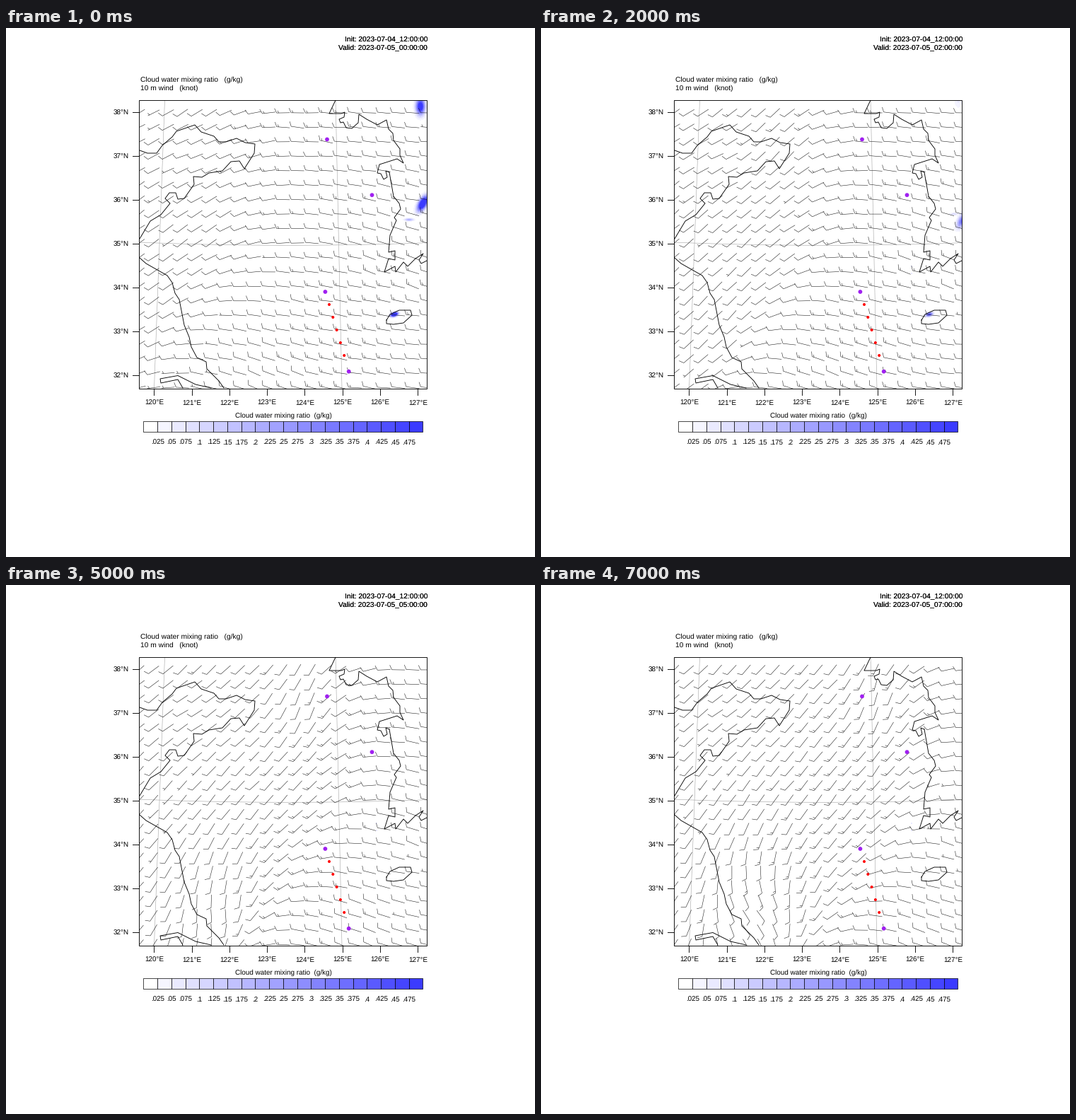
These frames come from a looping animation (748 by 748 pixels, 8 s). A matplotlib script:

```python
import numpy as np
import matplotlib.pyplot as plt
from matplotlib.animation import FuncAnimation
from matplotlib.collections import LineCollection
from matplotlib.patches import Circle, Rectangle

SIZE, DPI = 748, 100
PX = 72 / DPI  # points per pixel
L, R, T, B = 188.5, 595.5, 101.5, 509.5
HOURS = 8

plt.rcParams["font.family"] = "Liberation Sans"
plt.rcParams["text.hinting"] = "none"

fig = plt.figure(figsize=(SIZE / DPI, SIZE / DPI), dpi=DPI, facecolor="white")
ax = fig.add_axes([0, 0, 1, 1])
ax.set_axis_off()

# Key points of the coastlines, in stage pixels
SHANDONG = [
    (189, 173), (200, 177), (213, 177), (221, 166), (235, 154), (241, 146),
    (267, 137), (276, 147), (294, 153), (301, 161), (311, 161), (326, 156),
    (338, 162), (352, 164), (351, 177), (337, 199), (330, 188), (318, 189),
    (306, 202), (287, 205), (277, 211), (265, 210), (266, 221), (252, 241),
    (243, 242), (240, 233), (231, 233), (225, 241), (232, 248), (219, 264),
    (204, 273), (189, 298)]
JIANGSU = [
    (189, 325), (198, 333), (228, 350), (235, 360), (239, 375), (245, 384),
    (252, 420), (259, 437), (262, 451), (270, 466), (283, 472), (284, 482),
    (301, 499), (308, 509)]
ESTUARY = [
    (250, 509), (243, 497), (219, 502), (218, 496), (243, 491.5), (268, 504),
    (290, 509)]
KOREA_NORTH = [
    (466, 102), (457, 121), (474, 121), (479, 119), (478, 126), (471, 129),
    (473, 134), (477, 133), (481, 141), (489, 142), (498, 134), (499, 122),
    (510, 129), (525, 137), (538, 130), (541, 143), (547, 149), (548, 159),
    (557, 171), (557, 180), (562, 191), (553, 185), (528, 193), (525, 205),
    (530, 206), (534, 214), (539, 211), (537, 202), (542, 204)]
KOREA_SOUTH = [
    (542, 204), (548, 238), (556, 248), (558, 256), (549, 268), (552, 272),
    (543, 293), (541, 317), (550, 315), (550, 328), (541, 326), (535, 345),
    (550, 337), (551, 345), (562, 331), (568, 337), (579, 326), (590, 319),
    (584, 328), (587, 333), (595, 329)]
ISLAND = [
    (538, 413), (543, 405), (556, 399), (572, 399), (574, 406), (562, 417),
    (548, 419), (538, 418), (538, 413)]

COLS, ROWS = 21, 20
BX, BY = np.meshgrid(L + 20.35 * np.arange(COLS), 508.5 - 20.45 * np.arange(ROWS))
rng = np.random.default_rng(4)
WOBBLE = rng.normal(0, 2.5, BX.shape)
GUST = rng.normal(0, 1.2, BX.shape)


def shade(step):
    """Colour of the bar's boxes, 0 (white) to 19 (blue)."""
    f = np.asarray(step) / 19
    return np.stack([1 - .77 * f, 1 - .77 * f, np.ones_like(f)], axis=-1)


def label(x, y, s, px=10.3, ha="left"):
    return ax.text(x, y, s, fontsize=px * PX, ha=ha, va="baseline", zorder=8)


def stroke(points, color="black", width=.9, z=4, clip=True):
    xs, ys = zip(*points)
    line, = ax.plot(xs, ys, color=color, lw=width * PX, zorder=z,
                    solid_joinstyle="round")
    if clip:
        line.set_clip_path(frame)


def bump(x, y, cx, cy, rx, ry):
    return np.exp(-((x - cx) / rx) ** 2 - ((y - cy) / ry) ** 2)


def front(hour):
    """Line where southwesterlies meet westerlies; it moves east."""
    return 345 + 30 * hour - .75 * np.maximum(BY - 300, 0)


def heading(hour):
    """Degrees above east that the wind blows to."""
    edge = front(hour)
    west = (-4 - 14 * bump(BX, BY, 570, 310, 120, 110)
            - 16 * bump(BX, BY, 370 + 25 * hour, 500, 110, 90))
    south = (36 + 2 * hour - 13 * bump(BX, BY, 255, 180, 70, 60)
             + 11 * hour * bump(BX, BY, 300, 490, 75, 110)
             + 7 * min(hour, 4) * bump(BX, BY, edge - 75, 165, 40, 60))
    ahead = 1 / (1 + np.exp((edge - BX) / 25))
    return south + (west - south) * ahead + WOBBLE


def speed(hour):
    jet = 4 * np.exp(-((BX - 470 + 8 * hour) / 130) ** 2)
    wave = 1.2 * np.sin(BX / 60 + BY / 75 + .5 * hour)
    return 9 + jet + wave + GUST


def unit(deg):
    a = np.radians(deg)
    return np.array([np.cos(a), -np.sin(a)])


def barb(x, y, deg, knots):
    """Shaft centred on the grid point, feathers at the upwind end."""
    along, out = unit(deg), unit(deg + 115)
    mid = np.array([x, y])
    tail = mid - 9.2 * along
    lines = [(tail, mid + 9.2 * along)]
    fives = max(1, int((knots + 2.5) // 5))
    pos = 2.8 if fives == 1 else 0
    while fives > 0:
        root = tail + pos * along
        lines.append((root, root + (7.2 if fives > 1 else 3.6) * out))
        fives -= 2
        pos += 2.8
    return lines


def wind(hour):
    cells = zip(BX.flat, BY.flat, heading(hour).flat, speed(hour).flat)
    return [seg for cell in cells for seg in barb(*cell)]


def cloud(hour):
    """Patches that drift off to the east, one over the island, then specks."""
    x, y = np.meshgrid(np.arange(189, 596) + .5, np.arange(102, 510) + .5)
    fade = max(0, 1 - hour / 4)
    lean = x + .5 * (y - 405)  # island patch tilts up to the east
    total = .6 * .3 ** hour * bump(x, y, 586 + 2 * hour, 111 - 4 * hour, 6, 11)
    total += .75 * fade * bump(x + .4 * (y - 249), y,
                               589 + 8 * hour, 248 + 12 * hour, 6, 10)
    total += .2 * fade * bump(x, y, 570 + 7 * hour, 271 - 4 * hour, 6, 2)
    total += .9 * fade * bump(lean, y, 549, 405, 4.5, 3)
    if hour == 1:
        total += .55 * bump(x + (y - 402), y, 555, 402, 5, 2.5)
    if hour > 1:
        for cy in (337, 347):
            total += .09 * bump(x, y, 524, cy, 1, 1)
    return shade(np.clip(total // .025, 0, 19))


# Map
field = ax.imshow(cloud(0), extent=(189, 596, 510, 102),
                  aspect="auto", interpolation="nearest", zorder=1)
ax.set_xlim(0, SIZE)
ax.set_ylim(SIZE, 0)
frame = Rectangle((L, T), R - L, B - T, fill=False, ec="black", lw=.9 * PX, zorder=7)
ax.add_patch(frame)
field.set_clip_path(frame)

for line in ([(224.5, T), (209.5, B)], [(466, T), (475, B)]):
    stroke(line, "#a8a8a8", .6, 2)
arc = np.linspace(L, R, 40)
stroke([(x, 307.3 - 4 * ((x - 400) / 205) ** 2) for x in arc], "#a8a8a8", .6, 2)
for coast in (SHANDONG, JIANGSU, ESTUARY, KOREA_NORTH, KOREA_SOUTH, ISLAND):
    stroke(coast)

barbs = LineCollection(wind(0), colors="#1c1c1c", linewidths=.55 * PX, zorder=3)
ax.add_collection(barbs)
barbs.set_clip_path(frame)

for x, y in [(454, 157.5), (517.5, 236.2), (451.4, 373), (484.7, 485.7)]:
    ax.add_patch(Circle((x, y), 2.9, fc="#a020f0", ec="none", zorder=6))
for n in range(5):
    ax.add_patch(Circle((457 + 5.3 * n, 391 + 18 * n), 2, fc="red", ec="none", zorder=6))

# Axes
for n in range(7):
    y = 491.3 - 62.05 * n
    stroke([(179.5, y), (L, y)], clip=False)
    label(174, y + 3.5, f"{32 + n}°N", 9.9, "right")
for n in range(8):
    x = 209.3 + 53.3 * n
    stroke([(x, B), (x, 518.5)], clip=False)
    label(x, 533, f"{120 + n}°E", 9.9, "center")

# Titles
label(190.3, 76.4, "Cloud water mixing ratio   (g/kg)")
label(190.3, 88.2, "10 m wind   (knot)")
# Stacked twice for a heavier look
stamps = []
for _ in range(2):
    label(596, 19, "Init: 2023-07-04_12:00:00", ha="right")
    stamps.append(label(596, 31.3, "", ha="right"))

# Colour bar
label(392.5, 551.2, "Cloud water mixing ratio  (g/kg)", 9.9, "center")
for n in range(20):
    x = 194.5 + 19.75 * n
    ax.add_patch(Rectangle((x, 555.5), 19.75, 15, fc=shade(n), ec="black",
                           lw=.7 * PX, zorder=5))
    if n:
        mark = f"{.025 * n:.3f}".strip("0")
        label(x, 588.7, mark, 9.8, "center")


def draw(hour):
    barbs.set_segments(wind(hour))
    field.set_data(cloud(hour))
    for s in stamps:
        s.set_text(f"Valid: 2023-07-05_{hour:02d}:00:00")
    return [barbs, field, *stamps]


anim = FuncAnimation(fig, draw, frames=HOURS, interval=1000, repeat=True, blit=False)
plt.show()
```
